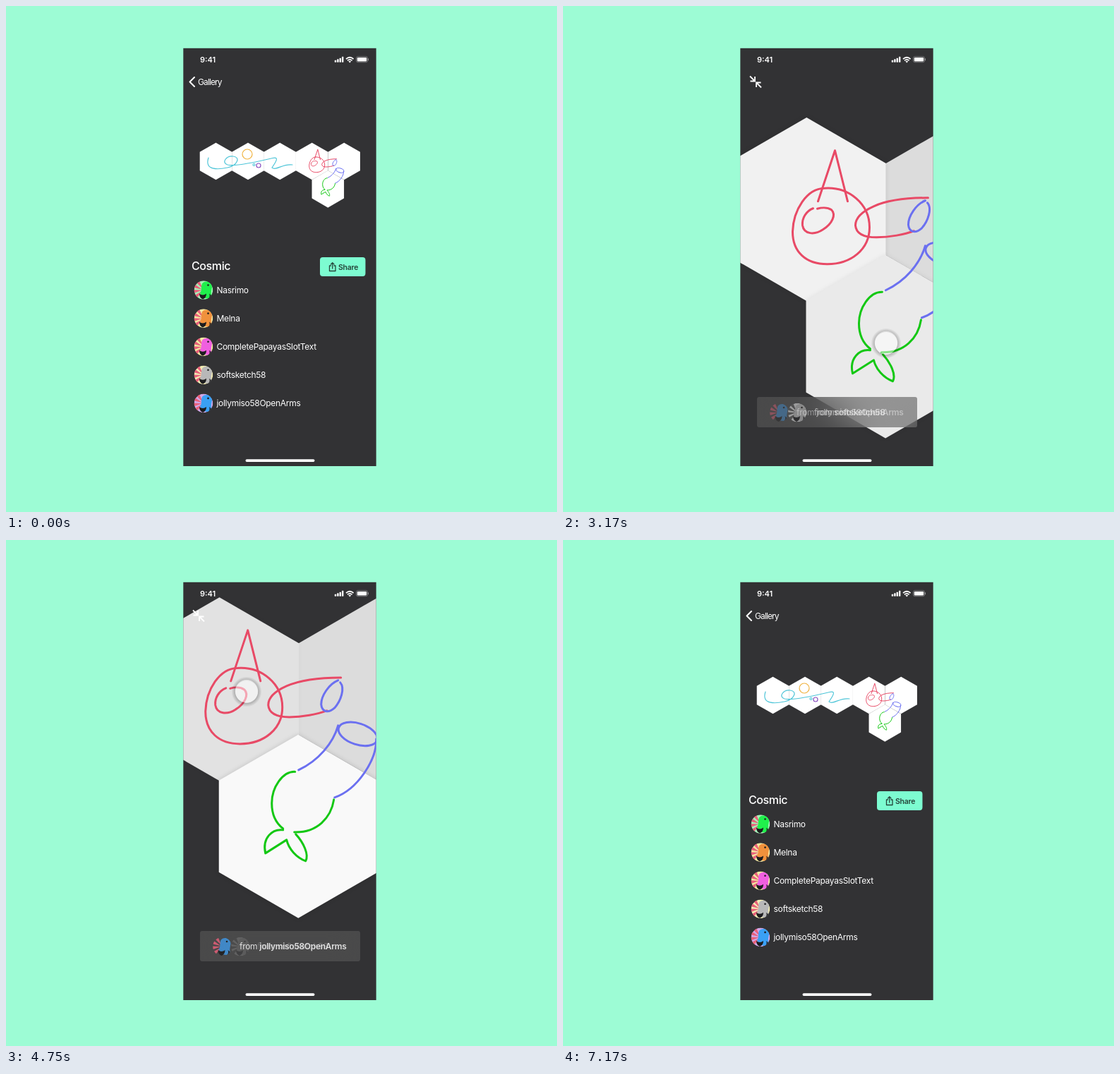
Animation, 781 px wide and 717 px high, one loop 7790 ms. Source, as an HTML page:

```html
<!DOCTYPE html>
<html lang="en">
<head>
<meta charset="utf-8">
<title>Hexagon gallery</title>
<style>
  html, body { margin: 0; width: 100%; height: 100%; overflow: hidden; background: #9dfcd5; }
  svg { position: absolute; left: 0; top: 0; width: 781px; height: 717px; }
  text { font-family: Inter, Roboto, sans-serif; font-size: 12px; letter-spacing: -.025em; fill: #fff; }
  .line { fill: none; stroke-linecap: round; stroke-linejoin: round; }
  #bar {
    position: absolute; left: 275px; top: 554px; width: 226.5px; height: 43px; border-radius: 3px;
    background: rgba(90, 90, 90, .6); backdrop-filter: blur(22px);
  }
</style>
</head>
<body>
<svg viewBox="0 0 781 717">
  <defs>
    <clipPath id="screen"><rect x="251.300" y="59.800" width="273.400" height="592.200"/></clipPath>
    <clipPath id="disc"><circle r="13.3"/></clipPath>
    <radialGradient id="halo">
      <stop offset=".72" stop-opacity="0"/>
      <stop offset=".76" stop-opacity=".22"/>
      <stop offset="1" stop-opacity="0"/>
    </radialGradient>
  </defs>
  <rect x="251.300" y="59.800" width="273.400" height="592.200" fill="#323234"/>
  <g clip-path="url(#screen)">
    <g id="board">
      <g id="cells"></g>
      <g id="drawing" class="line">
        <g stroke="#e84a66">
          <path d="M301 168L325 96L343 168"/>
          <path d="M310 149.500C345 147 374 172 374 205C374 236 348 257 314 257C284 257 265 240 265 211C266 180 285 150 310 149.500Z"/>
          <path d="M294 178C284 182 278 192 279 202C281 215 296 216 308 208C321 200 327 187 320 180C314 176 305 177 300 178.500"/>
          <path d="M457 163C425 163 398 167 380 175C362 183 354 193 354 202C355 214 366 219 384 219C402 219 424 215 437 210"/>
        </g>
        <g stroke="#6b70f0">
          <path d="M453 167C440 172 429 189 429 201C430 212 439 214 448 206C457 196 463 178 456 170"/>
          <ellipse cx="481" cy="243" rx="28.5" ry="15" transform="rotate(18 481 243)"/>
          <path d="M397 294C425 281 446 256 453 231M507 250C508 280 480 322 448 333"/>
        </g>
        <g stroke="#14c814">
          <path d="M392 296.500C374 296 359 319 359 341C359 358 366 370 375 377M447 336C443 362 423 383 391 382"/>
          <path d="M375 379C360 377 345 390 350 412L380 393C383 406 394 418 407 423C412 414 404 397 393 385"/>
        </g>
      </g>
    </g>
    <g id="smallCells"></g>
    <g id="strip" class="line" stroke-width="1.2">
      <path stroke="#4ec5d8" d="M287 215C281 233 300 232 314 229C328 226 333 214 322 213C312 212 305 222 314 225C325 228 355 221 378 215.500C388 213 382 222 377 229C383 234 392 223 406 225"/>
      <circle cx="342" cy="210" r="7" stroke="#f0b340"/>
      <circle cx="351.500" cy="225" r="1.500" stroke="#4ec5d8"/>
      <circle cx="358" cy="226" r="3" stroke="#8a4fc0"/>
    </g>
  </g>
</svg>

<div id="bar"></div>

<svg viewBox="0 0 781 717">
  <g id="list">
    <text x="272" y="111.700" style="letter-spacing:-.075em">Gallery</text>
    <text x="263" y="374" style="font-size:16px;font-weight:500">Cosmic</text>
    <rect x="445" y="356" width="64.500" height="27" rx="4" fill="#7dfcd1"/>
    <g class="line" stroke="#26443a" stroke-width="1.300">
      <path d="M460.500 368H458.500V375.500H467V368H465M462.750 372V364M460.500 366L462.750 363.700L465 366"/>
    </g>
    <text x="471" y="373.500" style="font-size:10.500px;font-weight:600;fill:#26443a">Share</text>
    <g id="people"></g>
  </g>
  <path id="back" class="line" stroke="#fff" stroke-width="2" d="M267 101L260.500 107.500L267 114"/>
  <path id="shrink" class="line" stroke="#fff" stroke-width="1.800" style="stroke-linecap:butt;stroke-linejoin:miter"
    d="M265 99.500L271.500 106M272 100V106.500H265.500M281 115.500L274.500 109M274 115V108.500H280.500"/>
  <g id="firstCaption"></g>
  <g id="secondCaption"></g>

  <text x="275" y="79.500" style="font-size:11px;font-weight:600;letter-spacing:0">9:41</text>
  <g id="signal" fill="#fff"></g>
  <g class="line" stroke="#fff" stroke-width="1.700" style="stroke-linecap:butt">
    <path d="M482 75.200Q487.300 70.300 492.600 75.200M484 77.400Q487.300 74.400 490.600 77.400"/>
  </g>
  <path d="M487.300 80.500L485.400 78.500Q487.300 77 489.200 78.500Z" fill="#fff"/>
  <rect x="496.500" y="71.700" width="16" height="8" rx="2.200" fill="none" stroke="#8b8b8d" stroke-width=".8"/>
  <rect x="497.800" y="73" width="13.400" height="5.400" rx="1.200" fill="#fff"/>
  <rect x="513" y="74.300" width="1" height="3" fill="#8b8b8d"/>
  <rect x="339.500" y="642.200" width="98" height="3.800" rx="1.900" fill="#fff"/>

  <g clip-path="url(#screen)">
    <g id="touch">
      <circle cy="1" r="21.500" fill="url(#halo)"/>
      <circle r="16" fill="#fff" fill-opacity=".5" stroke="#fff" stroke-opacity=".25"/>
    </g>
  </g>
</svg>

<script>
const LOOP = 7790, MOVE = 420;
const SMALL = 45.5 / 225;
const FOCUS = [387.5, 364], PAN = [-102.7, -184.7];
const ORIGIN = [FOCUS[0] + PAN[0], FOCUS[1] + PAN[1]];
const $ = id => document.getElementById(id);
const mix = (a, b, p) => a + (b - a) * p;
const clamp = v => Math.max(0, Math.min(1, v));
const smooth = v => { v = clamp(v); return v * v * (3 - 2 * v); };

function hexagon(x, y, w) {
  const h = w / Math.sqrt(3);
  const points = [[0, -2 * h], [w, -h], [w, h], [0, 2 * h], [-w, h], [-w, -h]];
  return `<polygon fill="#fff" points="${points.map(([dx, dy]) => [x + dx, y + dy]).join(' ')}"/>`;
}

function avatar(x, y, body, paper, ray) {
  const rays = [140, 172, 204, 236].map(a =>
    `<path fill="${ray}" transform="rotate(${a})" d="M2 0L15 -2.600V2.600Z"/>`).join('');
  return `<g transform="translate(${x} ${y})"><g clip-path="url(#disc)">
    <circle r="13.300" fill="${paper}"/>${rays}
    <path fill="${body}" d="M-2 -9C1 -14 12 -13 12 -4C11 2 10 4 12 13L-1 11L-5 4C-2 1 -4 -4 -2 -9Z"/>
    <path fill="#1c1c1e" d="M-6 5Q-1 9 4 5Q4 11 -1 13Q-6 11 -6 5ZM8 5Q13 8 11 13L6 13Q10 9 8 5Z"/>
    <circle cx="6.500" cy="-7" r="1.300" fill="#1c1c1e"/></g></g>`;
}

function caption(x, name, picture) {
  return `${picture}<text x="${x}" y="580">from <tspan font-weight="600">${name}</tspan></text>`;
}

const people = [
  ['Nasrimo', '#20f04c', '#a6f2b8'],
  ['Melna', '#f0913c', '#f3e6a0'],
  ['CompletePapayasSlotText', '#f05fe0', '#f1eba2'],
  ['softsketch58', '#b8b8b8', '#f2ecb4'],
  ['jollymiso58OpenArms', '#3aa0f5', '#d0a8e8']
];
$('people').innerHTML = people.map(([name, body, paper], i) => {
  const y = 402.5 + i * 40.1;
  return avatar(280, y, body, paper, '#e8607a') + `<text x="298.500" y="${y + 4.5}">${name}</text>`;
}).join('');
$('firstCaption').innerHTML = caption(356, people[3][0], avatar(332, 576, '#b5b5b5', '#d6d6d6', '#555'));
$('secondCaption').innerHTML = caption(331, people[4][0], avatar(306.5, 576, '#3f95e0', '#4a4a4a', '#e8607a'));
$('signal').innerHTML = [3, 4.5, 6, 8].map((h, i) =>
  `<rect x="${465.8 + i * 3.4}" y="${79.8 - h}" width="2.400" height="${h}" rx=".6"/>`).join('');

// Large cells: left and right neighbours, then the two that can be focused.
$('cells').innerHTML = [[-225, 0], [225, 0], [0, 0], [111.8, 194.5]]
  .map(([dx, dy]) => hexagon(ORIGIN[0] + dx, ORIGIN[1] + dy, 112.6)).join('');
$('smallCells').innerHTML = [-68.3, -22.8].map(x => hexagon(x, 0, 22.8)).join('');
const cells = [...$('cells').children];

const touchPath = [
  [540, 400, 40], [1290, 437, 215], [1630, 437, 217], [2130, 435, 230], [2210, 437, 243],
  [2560, 474, 370], [2920, 458, 477], [3650, 458, 477], [4480, 341, 214], [4900, 341, 214],
  [5440, 271, 98], [6180, 271, 98], [6600, 290, 91], [7150, 335, 36]
];

function touchAt(t) {
  const i = touchPath.findIndex(k => k[0] > t);
  if (i < 1) return [0, 0];
  const [t0, x0, y0] = touchPath[i - 1], [t1, x1, y1] = touchPath[i];
  const p = smooth((t - t0) / (t1 - t0));
  return [mix(x0, x1, p), mix(y0, y1, p)];
}

function fade(id, opacity) { $(id).style.opacity = clamp(opacity); }
function place(id, transform) { $(id).setAttribute('transform', transform); }

function render(t) {
  const step = start => smooth((t - start) / MOVE);
  const zoom = step(1471) - step(5640);
  const pan = step(2986) - step(4640);
  const scale = mix(SMALL, 1, zoom);
  const [panX, panY] = PAN.map(v => v * pan);
  const x = mix(433.7, FOCUS[0], zoom) + panX;
  const y = mix(220, FOCUS[1], zoom) + panY;

  place('board', `translate(${x} ${y}) scale(${scale}) translate(${-ORIGIN[0]} ${-ORIGIN[1]})`);
  $('drawing').setAttribute('stroke-width', mix(1, 3, zoom) / scale);
  place('smallCells', `translate(${365.8 - 316 * zoom + panX} ${y}) scale(${1 + .55 * zoom})`);
  place('strip', `translate(${-316 * zoom + panX} ${134 * zoom + panY})`);

  [1 - zoom, 1 - zoom, 1 - pan, 1 - zoom + pan].forEach((focus, i) => {
    const shade = Math.round(mix(220, 255, clamp(focus)));
    cells[i].setAttribute('fill', `rgb(${shade},${shade},${shade})`);
    cells[i].style.filter = `drop-shadow(0 0 3px rgba(0,0,0,${.18 * clamp(focus)}))`;
  });

  fade('list', 1 - zoom);
  fade('back', 1 - zoom * 3);
  fade('shrink', zoom * 3);
  place('shrink', `translate(${-4 * (1 - zoom)} 0)`);
  fade('bar', zoom);
  fade('firstCaption', zoom * (1 - pan));
  fade('secondCaption', zoom * pan);
  fade('touch', t >= touchPath[0][0] && t < touchPath.at(-1)[0] ? 1 : 0);
  place('touch', `translate(${touchAt(t)})`);
}

function tick() {
  render(performance.now() % LOOP);
  requestAnimationFrame(tick);
}
tick();
</script>
</body>
</html>
```
